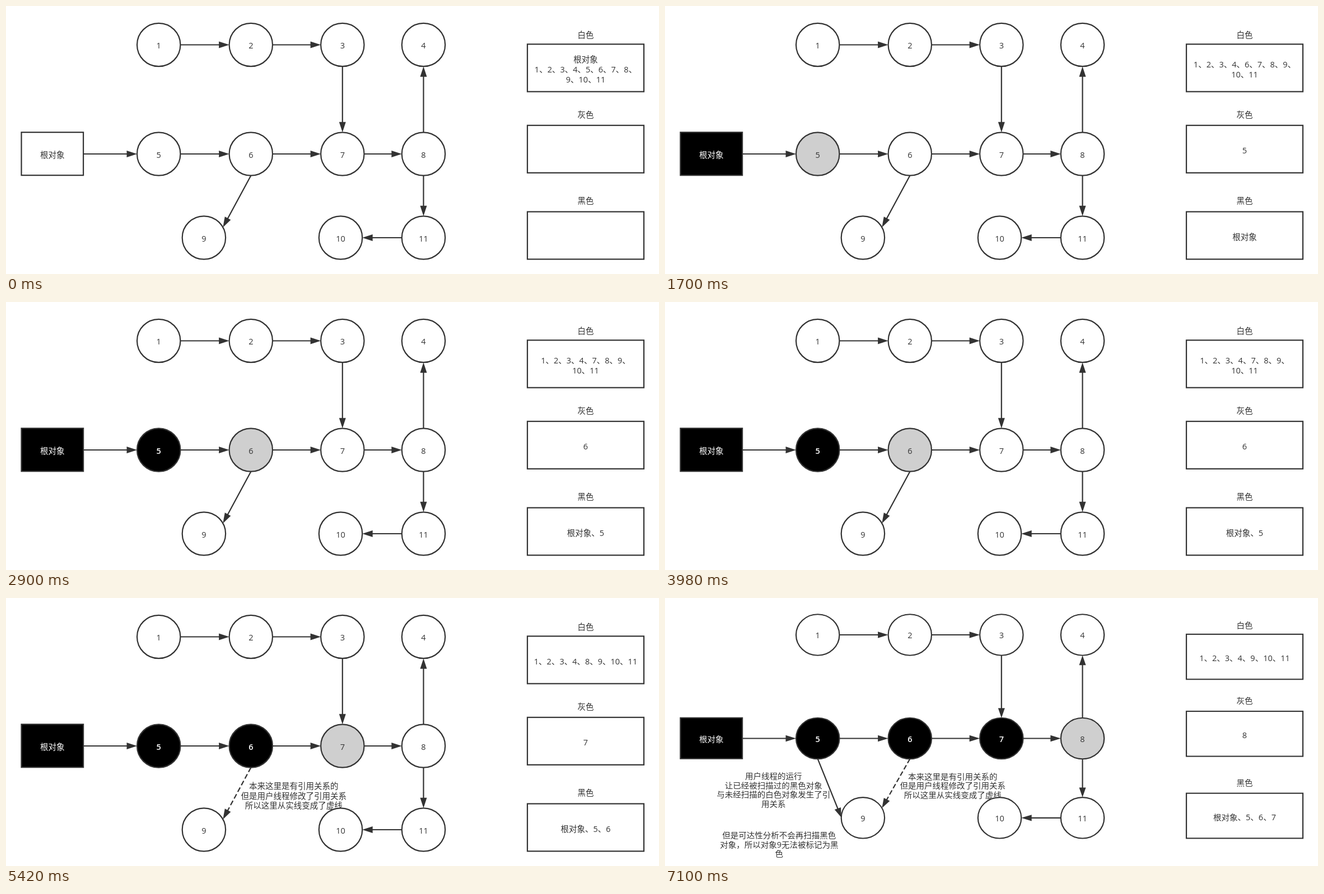
These frames come from a looping animation (1166x480 px, 8000 ms). An HTML page with a canvas:

```html
<!DOCTYPE html>
<html lang="zh-CN">
<head>
<meta charset="utf-8">
<style>
html, body { margin: 0; width: 100%; height: 100%; overflow: hidden; background: #fff; }
canvas { display: block; }
</style>
</head>
<body>
<canvas id="stage" width="1166" height="480"></canvas>
<script>
const ctx = document.getElementById('stage').getContext('2d');
const INK = '#323232', GRAY = '#cfcfcf';
const SIZE = 14.5, LEADING = 17.6, WRAP = 187;
const FAMILY = '"Open Sans", "Noto Sans CJK SC", "Noto Sans CJK", sans-serif';
const LOOP = 8000;
const ROOT = '根对象';
const R = 38.7;

const cols = [272.7, 437.3, 600.8, 745.5];
const [top_, mid, low] = [69.5, 265, 415];
const nodes = {
  1: [cols[0], top_], 2: [cols[1], top_], 3: [cols[2], top_], 4: [cols[3], top_],
  5: [cols[0], mid], 6: [cols[1], mid], 7: [cols[2], mid], 8: [cols[3], mid],
  9: [353.4, low], 10: [597.5, low], 11: [cols[3], low]
};
const links = [[1, 2], [2, 3], [3, 7], [5, 6], [6, 7], [7, 8], [8, 4], [8, 11], [11, 10]];
const visitOrder = [ROOT, '5', '6', '7', '8'];

// start time, index of the gray object, visible notes, vertical squeeze
const steps = [
  { at: 0, gray: -1, notes: 0, squeeze: 1 },
  { at: 500, gray: 0, notes: 0, squeeze: 1 },
  { at: 1700, gray: 1, notes: 0, squeeze: 1 },
  { at: 2900, gray: 2, notes: 0, squeeze: 1 },
  { at: 4700, gray: 3, notes: 1, squeeze: 1 },
  { at: 5900, gray: 3, notes: 3, squeeze: 0.949 },
  { at: 7100, gray: 4, notes: 3, squeeze: 0.949 }
];

const notes = [
  { x: 513.7, y: 342, lines: ['本来这里是有引用关系的', '但是用户线程修改了引用关系', '所以这里从实线变成了虚线'] },
  { x: 193.7, y: 341.5, lines: ['用户线程的运行', '让已经被扫描过的黑色对象', '与未经扫描的白色对象发生了引', '用关系'] },
  { x: 203.8, y: 453, lines: ['但是可达性分析不会再扫描黑色', '对象，所以对象9无法被标记为黑', '色'] }
];

function text(str, x, y, color = INK, weight = 400) {
  ctx.font = `${weight} ${SIZE}px ${FAMILY}`;
  ctx.textAlign = 'center';
  ctx.fillStyle = color;
  ctx.fillText(str, x, y);
}

function paragraph(lines, x, y) {
  lines.forEach((line, i) => text(line, x, y + i * LEADING));
}

function arrow(x1, y1, x2, y2, dashed = false) {
  const angle = Math.atan2(y2 - y1, x2 - x1);
  const length = Math.hypot(x2 - x1, y2 - y1);
  ctx.save();
  ctx.translate(x1, y1);
  ctx.rotate(angle);
  ctx.setLineDash(dashed ? [9, 4.5] : []);
  ctx.beginPath();
  ctx.moveTo(0, 0);
  ctx.lineTo(length - 16, 0);
  ctx.stroke();
  ctx.beginPath();
  ctx.moveTo(length, 0);
  ctx.lineTo(length - 18.5, -6);
  ctx.lineTo(length - 18.5, 6);
  ctx.fillStyle = INK;
  ctx.fill();
  ctx.restore();
}

function link(a, b) {
  const [ax, ay] = nodes[a], [bx, by] = nodes[b];
  const dx = Math.sign(bx - ax) * R, dy = Math.sign(by - ay) * R;
  arrow(ax + dx, ay + dy, bx - dx, by - dy);
}

function box(x, y, w, h, fill = '#fff') {
  ctx.fillStyle = fill;
  ctx.fillRect(x, y, w, h);
  ctx.strokeRect(x, y, w, h);
}

function look(name, gray) {
  const i = visitOrder.indexOf(name);
  if (i < 0 || i > gray) return ['#fff', INK, 400];
  return i === gray ? [GRAY, INK, 400] : ['#000', '#fff', 600];
}

function wrap(items) {
  ctx.font = `${SIZE}px ${FAMILY}`;
  const lines = [''];
  items.forEach((item, i) => {
    const part = item + (i < items.length - 1 ? '、' : '');
    const last = lines.length - 1;
    if (ctx.measureText(lines[last] + part).width > WRAP) lines.push(part);
    else lines[last] += part;
  });
  return lines;
}

function panel(title, titleY, y, lines) {
  const h = 85;
  text(title, 1035, titleY);
  box(931, y, 208, h);
  paragraph(lines, 1035, y + h / 2 + 8 - (lines.length - 1) * LEADING / 2);
}

function draw(step) {
  const { gray } = step;
  ctx.setTransform(1, 0, 0, 1, 0, 0);
  ctx.fillStyle = '#fff';
  ctx.fillRect(0, 0, 1166, 480);
  ctx.scale(1, step.squeeze);
  ctx.strokeStyle = INK;
  ctx.lineWidth = 2.2;

  notes.slice(0, step.notes).forEach(n => paragraph(n.lines, n.x, n.y));

  const [rootFill, rootInk] = look(ROOT, gray);
  box(27.5, 226.2, 110.6, 77, rootFill);
  text(ROOT, 82.8, 272.3, rootInk);

  for (const name in nodes) {
    const [x, y] = nodes[name];
    const [fill, ink, weight] = look(name, gray);
    ctx.beginPath();
    ctx.arc(x, y, R, 0, Math.PI * 2);
    ctx.fillStyle = fill;
    ctx.fill();
    ctx.stroke();
    text(name, x, y + 6.8, ink, weight);
  }

  arrow(138, mid, cols[0] - R, mid);
  links.forEach(([a, b]) => link(a, b));
  arrow(cols[1], mid + R, 387.3, 396.5, step.notes > 0);
  if (step.notes > 1) arrow(cols[0], mid + R, 315, 414.5);

  const reached = visitOrder.slice(0, gray + 1);
  const white = wrap(Object.keys(nodes).filter(n => !reached.includes(n)));
  if (gray < 0) white.unshift(ROOT);
  panel('白色', 57, 68.4, white);
  panel('灰色', 199.5, 213.8, [visitOrder[gray] || '']);
  panel('黑色', 354.3, 368.5, wrap(visitOrder.slice(0, Math.max(gray, 0))));
}

const start = performance.now();
function tick() {
  const t = (performance.now() - start) % LOOP;
  draw(steps.filter(s => s.at <= t).pop());
  requestAnimationFrame(tick);
}
tick();
</script>
</body>
</html>
```
